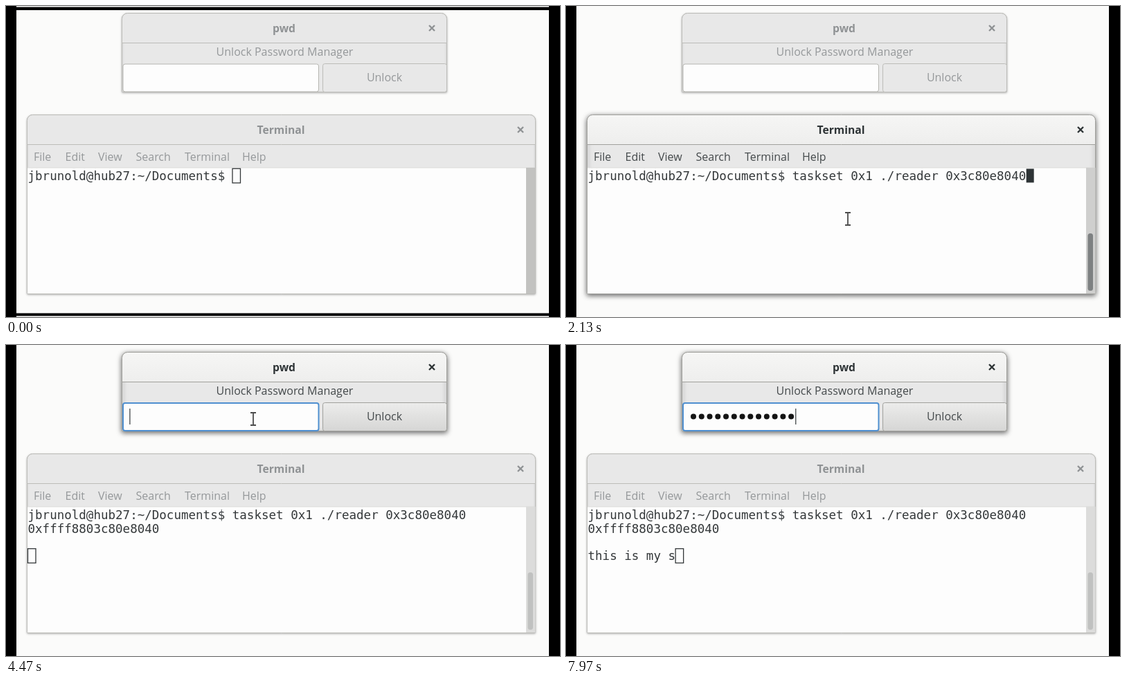
Recreate the animation shown at these times as an HTML page with a canvas. Size 800 px wide and 450 px high, loop 8 s.

```html
<!DOCTYPE html>
<html lang="en">
<head>
<meta charset="utf-8">
<title>Password manager and terminal</title>
<style>
  html, body { margin: 0; width: 100%; height: 100%; overflow: hidden; background: #000; }
  canvas { display: block; }
</style>
</head>
<body>
<canvas id="stage" width="800" height="450"></canvas>
<script>
const ctx = document.getElementById('stage').getContext('2d');

const LOOP = 8000;
const SCENE_CUT = 30, MANAGER_FOCUS = 4060, FADE = 200;
const TYPE_START = 700, TYPE_STEP = 52, PASTE = 2000, ENTER = 2880;
const SECRET_START = 4800, SECRET_STEP = 250, LEAK_DELAY = 200;

const PROMPT = 'jbrunold@hub27:~/Documents$ ';
const COMMAND = 'taskset 0x1 ./reader ';
const ADDRESS = '0x3c80e8040';
const SECRET = 'this is my secret';

const UI = '16px "Open Sans", "Noto Sans", sans-serif';
const UI_BOLD = 'bold 15.7px "Open Sans", "Noto Sans", sans-serif';
const MONO = '17.53px "DejaVu Sans Mono", monospace';
const CELL = 10.553, ROW = 19.8;
const INK = '#34383a', PAPER = '#fdfdfd', PANEL = '#e8e8e8';

// Each move: start time, end time, from, to. Typing hides the pointer.
const POINTER_MOVES = [
  { start: 1800, end: 2080, hide: ENTER, from: [425, 324], to: [407, 308] },
  { start: 3330, end: 4020, hide: SECRET_START, from: [407, 308], to: [357, 107] },
];

const clamp = v => Math.max(0, Math.min(1, v));
const ease = v => v * v * (3 - 2 * v);

function mix(from, to, f) {
  const part = (hex, i) => parseInt(hex.slice(1 + 2 * i, 3 + 2 * i), 16);
  return `rgb(${[0, 1, 2].map(i => Math.round(part(from, i) + (part(to, i) - part(from, i)) * f))})`;
}

function rect(x, y, w, h, color) {
  ctx.fillStyle = color;
  ctx.fillRect(x, y, w, h);
}

function text(str, x, y, font, color, align = 'left') {
  ctx.font = font;
  ctx.fillStyle = color;
  ctx.textAlign = align;
  ctx.fillText(str, x, y);
}

function roundBox(x, y, w, h, radii, fill, stroke, width = 1) {
  ctx.beginPath();
  ctx.roundRect(x, y, w, h, radii);
  ctx.fillStyle = fill;
  ctx.fill();
  ctx.strokeStyle = stroke;
  ctx.lineWidth = width;
  ctx.stroke();
}

function vertical(y1, y2, top, bottom) {
  const g = ctx.createLinearGradient(0, y1, 0, y2);
  g.addColorStop(0, top);
  g.addColorStop(1, bottom);
  return g;
}

const label = f => mix('#95989a', '#44494b', f);
const border = f => mix('#bcbcb8', '#a0a09c', f);

function windowFrame(x, y, w, h, title, f) {
  ctx.save();
  ctx.shadowColor = `rgba(0,0,0,${0.25 + 0.35 * f})`;
  ctx.shadowBlur = 3 + 4 * f;
  ctx.shadowOffsetY = 1 + f;
  roundBox(x + .5, y + .5, w - 1, h - 1, [8, 8, 1, 1], PANEL, border(f));
  ctx.restore();
  const header = vertical(y, y + 43, mix(PANEL, '#f6f6f5', f), mix(PANEL, '#eeeeed', f));
  roundBox(x + .5, y + .5, w - 1, 43, [8, 8, 0, 0], header, border(f));

  const color = mix('#8f9294', '#2e3436', f);
  text(title, x + w / 2 - .5, y + 27.5, UI_BOLD, color, 'center');
  const cx = x + w - 22, cy = y + 22;
  ctx.beginPath();
  for (const s of [-1, 1]) {
    ctx.moveTo(cx - 4, cy - 4 * s);
    ctx.lineTo(cx + 4, cy + 4 * s);
  }
  ctx.strokeStyle = color;
  ctx.lineWidth = 2.4;
  ctx.stroke();
}

function drawManager(t, f) {
  windowFrame(167, 10, 470, 115, 'pwd', f);
  text('Unlock Password Manager', 402.5, 71.5, UI, label(f), 'center');
  roundBox(169, 84, 282.5, 40, 3, PAPER, mix('#b4b4b0', '#4f8fd0', f), 1 + f);
  const face = vertical(84, 124, mix(PANEL, '#ececeb', f), mix(PANEL, '#d6d6d5', f));
  roundBox(457.5, 83.5, 179, 41, 3, face, border(f));
  text('Unlock', 546.5, 109, UI, label(f), 'center');

  const count = Math.max(0, Math.floor((t - SECRET_START) / SECRET_STEP) + 1);
  for (let i = 0; i < count; i++) {
    ctx.beginPath();
    ctx.arc(184 + 11.76 * i, 103.5, 4, 0, 2 * Math.PI);
    ctx.fillStyle = '#141414';
    ctx.fill();
  }
  if (t >= MANAGER_FOCUS) rect(178.3 + 11.76 * count, 92, 1.2, 23, INK);
}

function terminalLines(t) {
  const typed = Math.max(0, Math.floor((t - TYPE_START) / TYPE_STEP) + 1);
  const first = PROMPT + COMMAND.slice(0, typed) + (t >= PASTE ? ADDRESS : '');
  if (t < ENTER) return [first];
  const leaked = Math.max(0, Math.floor((t - SECRET_START - LEAK_DELAY) / SECRET_STEP) + 1);
  return [first, '0xffff8803c80e8040', '', SECRET.slice(0, leaked)];
}

// The block cursor stays lit after each key, then blinks.
function blinkOn(t) {
  const typingEnd = TYPE_START + COMMAND.length * TYPE_STEP;
  if (t >= TYPE_START && t < typingEnd) return true;
  const lastKey = [ENTER, PASTE, typingEnd].find(time => t >= time) ?? -100;
  return (t - lastKey) % 1200 < 600;
}

function drawTerminal(t, f) {
  windowFrame(30, 157, 735, 260, 'Terminal', f);
  const menu = { File: 40, Edit: 85.5, View: 133, Search: 187.5, Terminal: 258, Help: 341 };
  for (const [name, x] of Object.entries(menu)) text(name, x, 223.5, UI, label(f));

  rect(31, 234, 720, 182, PAPER);
  rect(31, 233.5, 733, 1, '#dcdcda');
  const started = t >= SCENE_CUT;
  rect(751, 234, 13.5, 182, started ? mix('#dcdcdb', '#cfcfce', f) : '#c2c2c0');
  if (started) {
    ctx.beginPath();
    ctx.roundRect(753.5, 329, 7.5, 83, 3.5);
    ctx.fillStyle = mix('#c0c1c0', '#7e8182', f);
    ctx.fill();
  }

  const lines = terminalLines(t);
  lines.forEach((line, i) => text(line, 31.5, 252 + ROW * i, MONO, INK));

  const row = lines.length - 1;
  const x = 31.5 + lines[row].length * CELL, y = 236 + ROW * row;
  if (f < .5) {
    ctx.strokeStyle = INK;
    ctx.lineWidth = 1.3;
    ctx.strokeRect(x, y - .7, 11.5, 20.7);
  } else if (blinkOn(t)) {
    rect(x, y - .5, 11, 20, '#2e3436');
  }
}

function drawPointer(t) {
  const move = POINTER_MOVES.find(m => t >= m.start && t < m.hide);
  if (!move) return;
  const k = ease(clamp((t - move.start) / (move.end - move.start)));
  const [x, y] = move.from.map((v, i) => v + (move.to[i] - v) * k);
  ctx.beginPath();
  for (const s of [-1, 1]) {
    ctx.moveTo(x - 4, y + 9 * s);
    ctx.lineTo(x + 4, y + 9 * s);
  }
  ctx.moveTo(x, y - 9);
  ctx.lineTo(x, y + 9);
  for (const [color, width] of [[PAPER, 4], ['#4c4c4c', 1.8]]) {
    ctx.strokeStyle = color;
    ctx.lineWidth = width;
    ctx.stroke();
  }
}

function draw(t) {
  rect(0, 0, 800, 450, '#000');
  rect(15, 0, 769, 450, '#fbfbfa');
  if (t < SCENE_CUT) {
    rect(15, 1.5, 769, 4.5, '#000');
    rect(15, 444.5, 769, 4, '#000');
  }
  const managerFocus = ease(clamp((t - MANAGER_FOCUS) / FADE));
  const terminalFocus = t < SCENE_CUT ? 0 : 1 - managerFocus;
  drawManager(t, managerFocus);
  drawTerminal(t, terminalFocus);
  drawPointer(t);
}

const start = performance.now();
function tick() {
  draw((performance.now() - start) % LOOP);
  requestAnimationFrame(tick);
}
tick();
</script>
</body>
</html>
```
